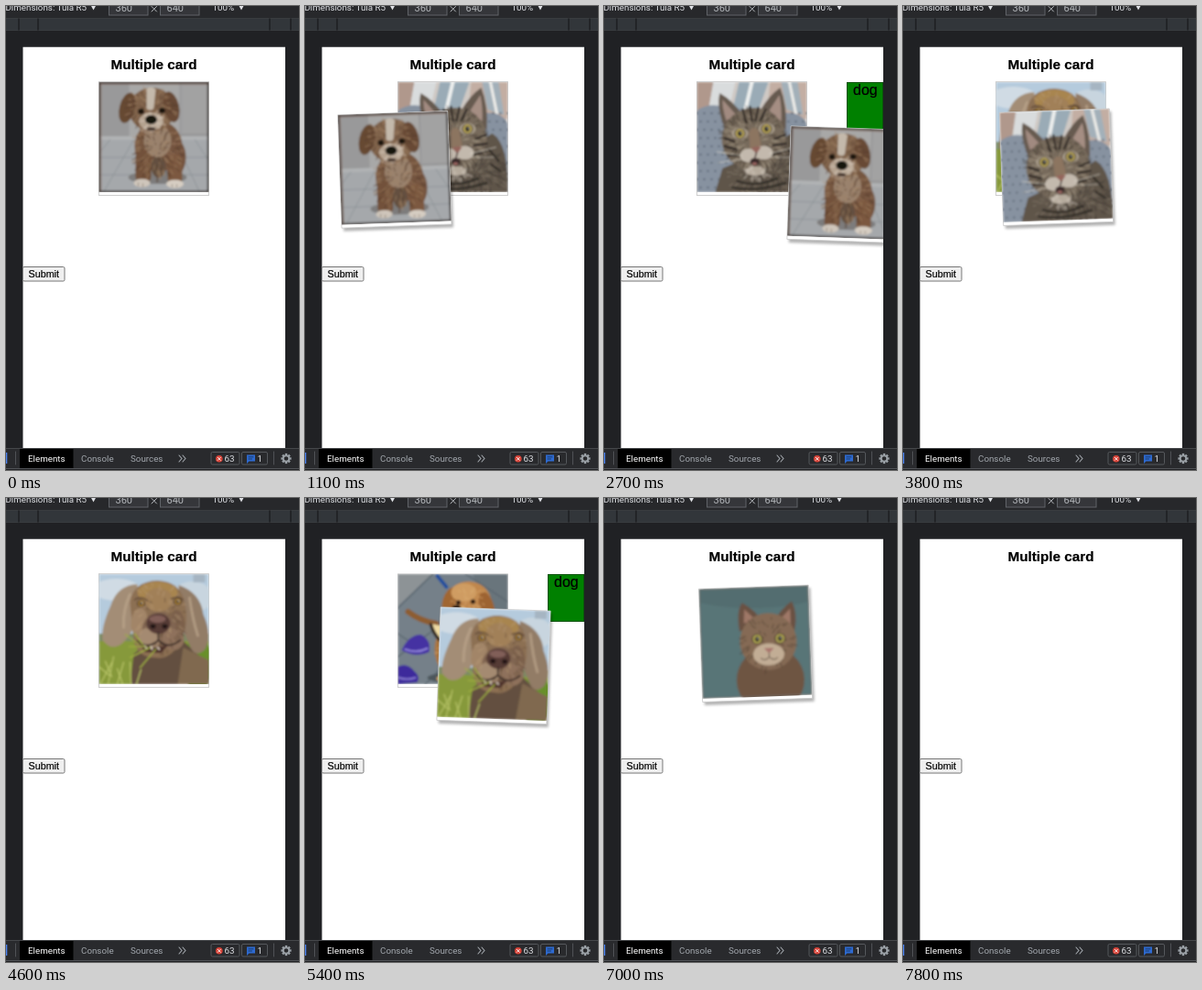
Recreate the animation shown at these times as an HTML page. Size 320 px wide and 506 px high, loop 8000 ms.

```html
<!DOCTYPE html>
<html lang="en">
<head>
<meta charset="utf-8">
<title>Multiple card</title>
<style>
  html, body { margin: 0; width: 100%; height: 100%; overflow: hidden; background: #202124; }
  svg { display: block; width: 100vw; height: 100vh; }
  .ui { font: 9.8px Roboto, "Open Sans", sans-serif; fill: #dfe1e5; }
  .page { font-family: "Liberation Sans", Arial, sans-serif; fill: #000; }
  .page text { stroke: #000; stroke-width: .2px; }
</style>
</head>
<body>
<svg id="stage" viewBox="0 0 320 506" xmlns="http://www.w3.org/2000/svg"></svg>
<script>
const LOOP = 8000, STEP = 100;
const HOME = { x: 161.5, y: 145 };

const rect = (x, y, w, h, fill, more = '') =>
  `<rect x="${x}" y="${y}" width="${w}" height="${h}" fill="${fill}" ${more}/>`;
const oval = (x, y, rx, ry, fill, turn = 0) =>
  `<ellipse cx="${x}" cy="${y}" rx="${rx}" ry="${ry}" fill="${fill}" transform="rotate(${turn} ${x} ${y})"/>`;
const shape = (d, fill) => `<path d="${d}" fill="${fill}"/>`;
const line = (d, color, width = 1, more = '') =>
  `<path d="${d}" fill="none" stroke="${color}" stroke-width="${width}" stroke-linecap="round" ${more}/>`;
const text = (x, y, s, more = '') => `<text x="${x}" y="${y}" ${more}>${s}</text>`;

let seed = 7;
const random = () => (seed = seed * 16807 % 2147483647) / 2147483647;

// Short strokes scattered over an ellipse, pointing away from its centre.
function fur(cx, cy, rx, ry, color, count) {
  let d = '';
  for (let i = 0; i < count; i++) {
    const a = random() * Math.PI * 2, r = Math.sqrt(random()), len = 2 + random() * 4;
    const x = cx + Math.cos(a) * r * rx, y = cy + Math.sin(a) * r * ry;
    d += `M${x.toFixed(1)} ${y.toFixed(1)}l${(Math.cos(a) * len).toFixed(1)} ${(Math.sin(a) * len + 1).toFixed(1)}`;
  }
  return line(d, color, 1.2, 'opacity=".55"');
}
const eye = (x, y, r, iris) =>
  oval(x, y, r + 1, r + .6, '#2a211c') + oval(x, y, r, r, iris) +
  oval(x, y, r * .5, r * .55, '#0c0b0a') + oval(x + .7, y - .8, .7, .7, '#fff');

function shaggyPuppy() {
  return rect(0, 0, 120, 120, '#a5a8ab') + rect(0, 0, 120, 61, '#99999a') +
    rect(33, 0, 55, 60, '#a8a8a7') + rect(90, 0, 30, 56, '#a2a2a2') +
    rect(0, 59, 120, 4, '#b0b2b4') +
    line('M0 82H120M0 101H120M38 63L5 120M83 63L110 120M12 63L0 78M105 63L120 86', '#8f9498') +
    shape('M64 100l8-9 9 8-8 11z', '#74797e') +
    oval(64, 104, 32, 7, '#7d7c7b') +
    oval(65, 70, 26, 28, '#765640') + oval(83, 82, 12, 20, '#755440') +
    rect(40, 74, 17, 36, '#72513a', 'rx="7"') + rect(75, 78, 16, 34, '#7b583f', 'rx="7"') +
    oval(65, 92, 8, 12, '#64503f') + oval(64, 64, 15, 18, '#9a826d') +
    fur(64, 74, 26, 28, '#a58567', 90) + fur(64, 78, 26, 26, '#523a29', 70) +
    oval(47, 110, 9, 4.5, '#cfc6bb') + oval(83, 111, 9.5, 4.5, '#d6cdc2') +
    line('M43 110v3M48 111v3M80 112v2M85 112v2', '#8f8478') +
    oval(58, 30, 25, 24, '#80634b') + oval(31, 28, 8.5, 17, '#664833', 15) + oval(79, 27, 8.5, 17, '#684a35', -13) +
    fur(57, 29, 25, 21, '#a98a6c', 80) + fur(57, 29, 26, 20, '#503a2b', 60) +
    shape('M52 7Q58 4 62 8L60 27Q59 33 52 29z', '#c4b9ab') +
    oval(57, 43, 13, 10, '#b5a390') + fur(57, 43, 12, 9, '#dcd2c5', 45) +
    oval(46, 32, 3.4, 3.2, '#1c1510') + oval(69, 31, 3.4, 3.2, '#1c1510') +
    oval(57, 41, 6.5, 5, '#17130f') + oval(57, 51, 5, 2, '#4b3b31') +
    '<rect x=".7" y=".7" width="118.6" height="118.6" fill="none" stroke="#28221f" stroke-width="2"/>' +
    line('M2 2.3H118M2.3 2V118', '#8f7168', .8);
}

function tabbyCat() {
  const dots = Array.from({ length: 160 }, (_, i) =>
    oval(i % 16 * 8 + Math.floor(i / 16) % 2 * 4, 34 + Math.floor(i / 16) * 9, 1.2, 1.2, '#646f7c')).join('');
  return rect(0, 0, 120, 120, '#cfc9c4') + shape('M0 0H18L12 34H0z', '#b0988c') +
    shape('M18 0H42L34 34H12z', '#d9dcdd') + shape('M46 0H78L66 34H38z', '#9aabb6') +
    line('M60 0L52 34', '#eef0ef', 4) + shape('M80 0H120V40H76z', '#c3aea3') +
    shape('M92 0H110L116 36 98 30z', '#a3b0b9') + line('M101 0L108 34', '#efeeea', 3) +
    shape('M0 31Q12 22 30 27L95 34Q113 31 120 45V120H0z', '#8792a0') + dots +
    shape('M28 94Q64 80 103 56Q121 67 120 120H20z', '#5f554a') +
    fur(78, 104, 42, 20, '#8d8172', 90) + fur(84, 98, 34, 24, '#342e29', 90) +
    shape('M30 50Q21 26 25 12Q39 20 50 36z', '#665a50') + shape('M69 31Q79 14 91 6Q99 26 97 52z', '#665a50') +
    shape('M32 42Q27 26 28 19L43 36z', '#a18a80') + shape('M79 31L90 14Q93 28 92 43z', '#a58e83') +
    oval(62, 62, 35, 34, '#776a5b', -8) + fur(62, 62, 34, 32, '#383029', 130) + fur(62, 68, 33, 30, '#b3a693', 90) +
    line('M50 30l4 14M58 27l2 15M67 28l-3 14M75 30l-6 12M30 61l11 4M30 70l13 3M97 57l-12 5M97 67l-14 2M34 80l10 0M92 77l-10 2', '#302a25', 2.4) +
    oval(47, 56, 9, 6.5, '#a89c8a') + oval(76, 51, 9, 6.5, '#a89c8a') +
    eye(47, 56, 4.9, '#baa75c') + eye(76, 51, 4.9, '#baa75c') +
    shape('M57 54Q62 47 67 52L71 73 65 79 58 75z', '#8c7561') +
    oval(57, 80, 10, 7.5, '#c3b9ad') + oval(73, 77, 10, 7.5, '#c3b9ad') +
    shape('M59 72Q65 69 70 71L65 78z', '#94655c') + line('M65 77L63 84', '#43322e', 1.4) +
    oval(63, 87, 5, 4.2, '#3b2929') + oval(63, 89, 2.6, 1.5, '#a06b65') +
    oval(64, 97, 11, 5, '#b5aa9c') + fur(65, 99, 13, 6, '#d8d0c5', 25) +
    line('M49 80L22 76M50 84L23 88M79 78L107 71M80 82L108 82', '#e5dfd4', .6) +
    line('M44 108q20 7 44-3M39 115q25 5 58-5M100 74l10 12M102 90l10 7', '#332d28', 2.5);
}

function greyHound() {
  return rect(0, 0, 120, 120, '#b5cbdd') + oval(19, 17, 26, 12, '#d0dbe4') + oval(102, 25, 22, 17, '#c8d5df') +
    rect(0, 65, 120, 10, '#7b8b65') + rect(0, 73, 120, 47, '#86993a') + oval(108, 98, 16, 30, '#688f2c') +
    shape('M103 0h13v9h-13z', '#a6b5c2') +
    shape('M38 87Q50 75 91 72L120 99V120H34z', '#63503f') + shape('M92 80L120 94V120H86z', '#80694f') +
    shape('M42 11Q20 12 13 34Q2 58 4 72Q14 85 26 75Q42 60 41 37z', '#a38d76') +
    shape('M87 12Q111 20 114 44Q124 66 116 82Q104 94 98 75Q88 56 88 39z', '#927b66') +
    line('M34 22Q26 39 27 58M99 26Q102 48 108 67', '#bda58c', 3, 'opacity=".7"') +
    shape('M34 31Q37 8 64 7Q90 8 94 33Q99 56 88 75Q78 94 61 91Q43 91 38 73z', '#8c6f53') +
    oval(64, 20, 22, 12, '#a8854f') + oval(65, 28, 15, 13, '#a18059') + oval(44, 52, 9, 15, '#a28568', 8) +
    oval(86, 54, 8, 15, '#7b604c', -7) +
    oval(66, 62, 19, 21, '#806551') + oval(55, 70, 12, 12, '#a48a71') + oval(81, 71, 12, 12, '#8e715b') +
    fur(64, 40, 29, 30, '#b99b78', 45) + fur(72, 55, 22, 32, '#5d4736', 40) +
    eye(46, 32, 3.2, '#b58a3f') + eye(86, 30, 3.2, '#b58a3f') +
    line('M39 28q7-5 14 1M79 27q7-4 13 1', '#5d4636', 1.5) +
    oval(65, 54, 13, 11, '#553a35') + oval(64, 49, 9, 4, '#815f59') + oval(59, 57, 3, 2.4, '#231817') + oval(72, 57, 3, 2.4, '#231817') +
    line('M65 64v7M42 73q12 10 23-1q10 11 24 0', '#413029', 2) +
    shape('M44 75Q58 84 76 77L68 86 50 85z', '#4d302c') + line('M50 78l2 3M57 79l1 3M64 80l2 2', '#e8dccb', 1.6) +
    line('M43 76L29 66M51 79L33 79M56 80L34 91M62 82L45 102M48 77L39 65', '#9cab41', 1.4) +
    line('M0 101l11 9M2 119l13-24M10 120l6-30M20 120l7-24M26 120l-6-17M35 120l-1-24M41 120l5-16M7 95l7 17', '#b8c468', 1.2);
}

function goldenPuppy() {
  return rect(0, 0, 120, 120, '#748089') + shape('M0 0H37L0 35z', '#8d9396') + shape('M82 0H120V53L95 36z', '#69747c') +
    line('M0 37L38 0M0 90L39 61L120 112M30 120L67 82M74 0L120 30M0 65L28 84', '#59656d', 1.3) +
    oval(108, 104, 14, 13, '#bdb4a7') + oval(103, 101, 9, 8, '#d8cab5') + oval(65, 113, 33, 6, '#4d565c') +
    line('M43 2L53 14', '#244f9d', 4) +
    line('M42 54Q24 51 11 41', '#8d5d32', 6) +
    oval(64, 82, 24, 31, '#a97540') + oval(55, 101, 9, 15, '#b58047') + oval(81, 98, 8, 18, '#be8a51') +
    oval(51, 114, 9, 4, '#d1a168') + oval(83, 114, 8, 4, '#d9aa70') + fur(65, 84, 21, 25, '#d2a068', 55) +
    shape('M36 54Q58 61 91 47Q99 60 94 74Q75 88 59 79Q42 74 36 54z', '#efdca5') +
    line('M36 55Q42 76 63 80Q79 84 94 72', '#30251f', 3.5) + line('M50 67q8 8 18 6', '#4d3927', 4) +
    oval(77, 31, 25, 23, '#c0874d') + oval(56, 29, 7, 15, '#a06633', 18) + oval(97, 36, 8, 17, '#9d6332', -15) +
    oval(72, 20, 14, 10, '#cf9c62') + fur(78, 28, 18, 15, '#dbae73', 35) +
    oval(66, 31, 2.7, 2.5, '#291911') + oval(82, 30, 2.7, 2.5, '#291911') +
    oval(67, 43, 11, 8, '#dfb77f') + oval(64, 37, 5, 3.6, '#271d19') +
    shape('M55 45Q65 47 72 44Q73 56 63 56Q57 54 55 45z', '#432522') + oval(64, 52, 4, 3, '#d68280') +
    shape('M4 83Q12 66 25 66Q37 72 34 85Q20 92 4 83z', '#4432a2') + line('M8 82Q21 87 32 81', '#8c80d5', 2) +
    shape('M0 101Q10 96 18 106Q25 112 21 118L0 120z', '#3d2b9b') + line('M1 113Q10 116 19 113', '#8275cb', 2);
}

function brownCat() {
  return rect(0, 0, 120, 120, '#587477') + shape('M0 0H120V18Q60 30 0 15z', '#526d70') +
    shape('M43 48Q40 25 47 17Q61 25 69 39z', '#6b5143') + shape('M81 38Q90 24 101 17Q108 31 102 53z', '#6b5143') +
    shape('M48 39L49 24 62 37z', '#9f7867') + shape('M87 37L99 25 99 45z', '#9f7867') +
    oval(75, 102, 37, 36, '#6e5543') + oval(74, 60, 31, 31, '#856b54') + fur(74, 61, 28, 28, '#4a3a2f', 70) +
    oval(74, 74, 17, 12, '#c2ad95') + eye(62, 57, 4.8, '#b8ad59') + eye(87, 57, 4.8, '#b8ad59') +
    shape('M69 67h11l-5.5 6z', '#a8756d') + line('M74.5 73v4q-5 5-9 1M74.5 77q5 5 9 1', '#493a30') +
    '<rect x=".5" y=".5" width="119" height="119" fill="none" stroke="#6f6c68"/>';
}

// Each path is a list of [time, dx, dy, tilt]; the card is gone after its last time.
const cards = [
  { draw: shaggyPuppy, path: [[0, 0, 0, 0], [100, -3, 6, -2], [700, -58, 32, -2], [900, -58, 32, -2],
    [1400, -72, 36, -2], [1900, -43, 33, -2], [2100, -22, 35, 2], [2700, 100.5, 50, 2], [3000, 175, 55, 2], [3100, 210, 55, 2]] },
  { draw: tabbyCat, path: [[3500, 0, 0, 0], [3600, 3, 12, -2], [3800, 6, 31, -2], [4400, -115, 42, -2], [4600, -205, 46, -2]] },
  { draw: greyHound, path: [[4900, 0, 0, 0], [5000, -3, 12, 2], [5200, -6, 31, 2], [5600, 95, 45, 2], [5800, 205, 50, 2]] },
  { draw: goldenPuppy, path: [[5900, 0, 0, 0], [6000, -5, 16, 2], [6100, -8.5, 30, 2], [6400, 95, 46, 2], [6600, 205, 50, 2]] },
  { draw: brownCat, path: [[6900, 0, 0, 0], [7000, 4, 14, -2], [7200, 6, 31, -2], [7600, -115, 44, -2], [7800, -205, 48, -2]] }
];

function pose(path, t) {
  if (t >= path[path.length - 1][0]) return null;
  const next = path.findIndex(key => key[0] > t);
  if (next === 0) return path[0].slice(1);
  const from = path[next - 1], to = path[next];
  const k = (t - from[0]) / (to[0] - from[0]);
  return from.slice(1).map((v, i) => v + (to[i + 1] - v) * k);
}

const cardMarkup = (card, i) => `<g id="card${i}">
  <g id="shade${i}">${rect(-58, -59, 120, 124, '#000', 'opacity=".3" filter="url(#shadow)"')}</g>
  ${rect(-60, -62, 120, 123.5, '#fff', 'stroke="#c9c9c9" stroke-width=".8"')}
  <g transform="translate(-60 -62)" clip-path="url(#photo)"><g filter="url(#soft)">${card.draw()}</g></g></g>`;

const field = (x, value) => rect(x, -6, 42.5, 16, '#35363a', 'stroke="#606368"') +
  text(x + 7, 6, value, 'font-size="11" fill="#b4b7bb"');

const toolbar = `<g class="ui">
  ${rect(0, 0, 320, 13, '#27282b')}
  ${text(88, 5, 'Dimensions: Tula R5', 'text-anchor="end"')}${shape('M92.5-1h6l-3 5.5z', '#dfe1e5')}
  ${field(112.5, '360')}${line('M159 .5l5.5 5.5m0-5.5l-5.5 5.5', '#b4b7bb')}${field(168.5, '640')}
  ${text(225.5, 5, '100%')}${shape('M254-1h6l-3 5.5z', '#dfe1e5')}
  ${rect(0, 13, 320, 14, '#32363a')}${line('M0 13.5H320M0 26.5H320', '#3d4043', .7)}
  ${line('M14 14V26M35 14V26M288 14V26M311 14V26', '#1b1c1e', 1.3)}</g>`;

const teeth = Array.from({ length: 8 }, (_, i) =>
  rect(-1.2, -5.6, 2.4, 3, '#9aa0a6', `transform="rotate(${i * 45})"`)).join('');
const tabs = `<g class="ui">
  ${rect(0, 482, 320, 24, '#292a2d')}${line('M0 482.5H320', '#45474a')}
  ${rect(15, 483, 58.5, 21, '#000')}${rect(0, 487, 1.3, 12, '#4a82f0')}
  ${line('M10.5 486V500M292.5 486V500', '#505256')}
  ${text(24, 496.5, 'Elements', 'fill="#fff"')}
  <g fill="#a2a7ad">${text(82, 496.5, 'Console')}${text(136, 496.5, 'Sources')}</g>
  ${line('M189 490l3 3.5-3 3.5M193 490l3 3.5-3 3.5', '#a2a7ad', 1.1)}
  ${rect(224, 486.5, 31, 13.5, 'none', 'stroke="#55585c" rx="1.5"')}${rect(257.5, 486.5, 28, 13.5, 'none', 'stroke="#55585c" rx="1.5"')}
  ${oval(232.8, 493.8, 3.8, 3.8, '#d8453a')}${line('M231.3 492.3l3 3m0-3l-3 3', '#fff', .9)}
  ${text(238.5, 497, '63')}${shape('M263 489.5h9v7h-6.5l-2.5 2.5z', '#2e6ad0')}
  ${line('M265 491.8h5M265 494h3.5', '#16345f', .9)}${text(274.5, 497, '1')}
  <g transform="translate(306 493.5)">${teeth}<circle r="3.2" fill="none" stroke="#9aa0a6" stroke-width="1.7"/></g>
  ${line('M0 504.5H320', '#505256')}${rect(0, 505, 320, 1, '#202124')}</g>`;

const page = rect(18.3, 44.5, 286.7, 438, '#fff');
const stage = document.getElementById('stage');
stage.innerHTML = `<defs>
  <clipPath id="page">${page}</clipPath>
  <clipPath id="photo">${rect(0, 0, 120, 120, '#fff')}</clipPath>
  <filter id="soft" x="0" y="0" width="1" height="1"><feGaussianBlur stdDeviation=".8"/></filter>
  <filter id="shadow" x="-.1" y="-.1" width="1.2" height="1.2"><feGaussianBlur stdDeviation="1.6"/></filter></defs>
  ${rect(0, 0, 320, 506, '#202124')}${toolbar}
  <g clip-path="url(#page)" class="page">${page}
    ${text(161.5, 69, 'Multiple card', 'text-anchor="middle" font-size="15.25" font-weight="700"')}
    ${rect(18.5, 284.5, 45.5, 15.5, '#efefef', 'stroke="#767676" rx="1.5"')}
    ${text(24.5, 296, 'Submit', 'font-size="10.75"')}
    <g id="label">${rect(265.5, 83.5, 39, 51, '#008000', 'stroke="#0b520b"')}${text(272, 97, 'dog', 'font-size="16"')}</g>
    ${cards.map(cardMarkup).reverse().join('')}
  </g>${tabs}`;

const find = id => document.getElementById(id);
const show = (node, on) => node.setAttribute('display', on ? 'inline' : 'none');
const nodes = cards.map((_, i) => ({ card: find('card' + i), shade: find('shade' + i) }));
const label = find('label');

function render(ms) {
  const t = Math.floor(ms % LOOP / STEP) * STEP;
  let labelled = false;
  cards.forEach(({ path }, i) => {
    const now = pose(path, t), { card, shade } = nodes[i];
    show(card, now);
    if (!now) return;
    const [dx, dy, tilt] = now;
    card.setAttribute('transform', `translate(${HOME.x + dx} ${HOME.y + dy}) rotate(${tilt})`);
    show(shade, dy > 0);
    labelled = labelled || dx > 40;
  });
  show(label, labelled);
}

let start;
function tick(now) {
  if (start === undefined) start = now;
  render(now - start);
  requestAnimationFrame(tick);
}
render(0);
requestAnimationFrame(tick);
</script>
</body>
</html>
```
